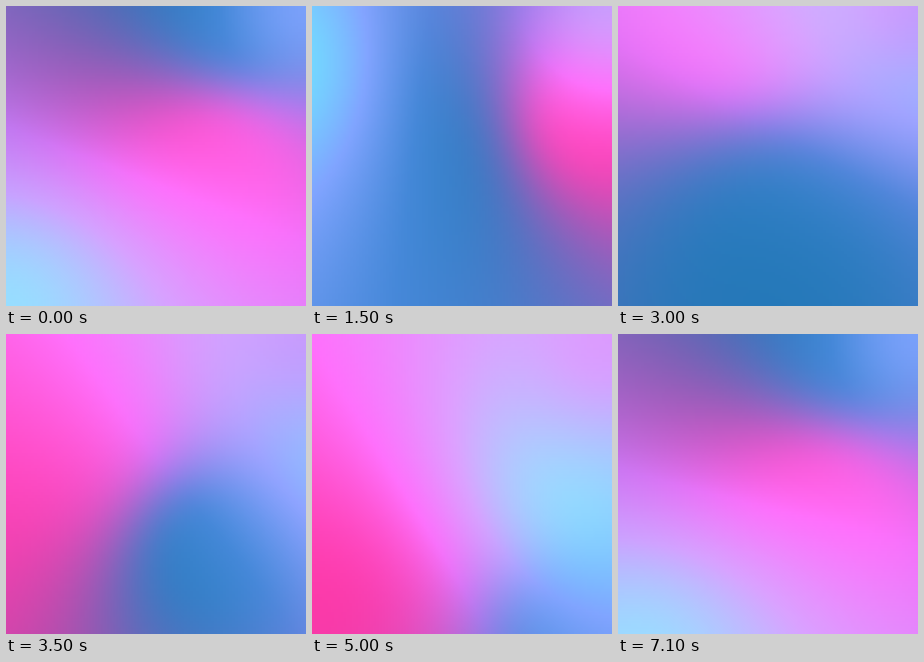
An HTML page with a canvas for the animation above (7.2 s loop, 300x300 px).

```html
<!DOCTYPE html>
<html lang="en">
<head>
<meta charset="utf-8">
<title>Drifting gradient</title>
<style>
  html, body { margin: 0; width: 100%; height: 100%; overflow: hidden; }
  canvas { display: block; width: 100vw; height: 100vh; }
</style>
</head>
<body>
<canvas id="stage" width="100" height="100"></canvas>
<script>
const LOOP = 7200, STEP = 100, SIZE = 300, GRID = 100, TAU = Math.PI * 2;
// Key times; the orbits rest between 4200 and 5100.
const TIMES = [0, 800, 2300, 3500, 4200, 5100, 6000, LOOP];
const POSES = [0, 1, 2, 3, 4, 4, 5, 6];

// Four poles circle the middle of the stage once per loop: pink and blue one way,
// light and dark the other. Angles in degrees, radii in pixels, one per pose.
const orbit = (turn, angles, radii) =>
  ({ angles: [...angles, angles[0] + turn], radii: [...radii, radii[0]] });
const pink = orbit(-360, [23, 0, -38, -143, -153, -188], [65, 105, 178, 150, 112, 71]);
const blue = orbit(-360, [-61, -156, -233, -311, -311, -400], [184, 98, 100, 92, 184, 156]);
const light = orbit(360, [133, 131, 288, 337, 355, 394], [219, 227, 221, 260, 110, 302]);
const dark = orbit(360, [263, 265, 413, 486, 495, 585], [171, 120, 150, 222, 212, 311]);
// How strongly blue outweighs pink in each pose.
const BLUENESS = [1, 4, 2.5, 0.35, 0.2, 0.3, 1];

// Colour ramps from dark to light.
const ramp = text => text.split(' ').map(c => [0, 2, 4].map(i => parseInt(c.slice(i, i + 2), 16)));
const PINKS = ramp('ff38a8 ff70fc dca2ff a0dcff');
const BLUES = ramp('2478b8 4488d8 80a4ff 70e4ff');

const ctx = document.getElementById('stage').getContext('2d');
const image = ctx.createImageData(GRID, GRID);
const mix = (a, b, u) => a + (b - a) * u;
const smooth = u => u * u * (3 - 2 * u);
const dist2 = (x, y, p) => (x - p.x) ** 2 + (y - p.y) ** 2;

// 1 at pole a, 0 at pole b; a bigger weight shrinks the realm of a.
function between(x, y, a, b, weight) {
  const toB = dist2(x, y, b);
  return toB / (toB + weight * dist2(x, y, a) + 1e-6);
}

function draw(t) {
  const k = TIMES.findIndex(end => end > t);
  const u = (t - TIMES[k - 1]) / (TIMES[k] - TIMES[k - 1]);
  const at = keys => mix(keys[POSES[k - 1]], keys[POSES[k]], u);
  const place = ({ angles, radii }) => {
    const a = at(angles) / 360 * TAU, r = at(radii);
    return { x: SIZE / 2 + r * Math.cos(a), y: SIZE / 2 + r * Math.sin(a) };
  };
  const [p, b, l, d] = [pink, blue, light, dark].map(place);
  const weight = at(BLUENESS), corner = { x: SIZE, y: 0 };

  for (let i = 0; i < GRID * GRID; i++) {
    const x = (i % GRID + 0.5) * SIZE / GRID;
    const y = (Math.floor(i / GRID) + 0.5) * SIZE / GRID;
    const hue = smooth(between(x, y, p, b, weight));
    // The top right corner always glows softly.
    const glow = Math.exp(-dist2(x, y, corner) / (2 * 75 ** 2));
    const tone = 3 * mix(between(x, y, l, d, 2), 0.62, glow);
    const stop = Math.min(2, Math.floor(tone)), rest = tone - stop;
    for (let c = 0; c < 3; c++) {
      image.data[i * 4 + c] = mix(
        mix(BLUES[stop][c], BLUES[stop + 1][c], rest),
        mix(PINKS[stop][c], PINKS[stop + 1][c], rest), hue);
    }
    image.data[i * 4 + 3] = 255;
  }
  ctx.putImageData(image, 0, 0);
}

const start = performance.now();
let shown = -1;
function tick() {
  const t = Math.floor(((performance.now() - start) % LOOP) / STEP) * STEP;
  if (t !== shown) draw(shown = t);
  requestAnimationFrame(tick);
}
tick();
</script>
</body>
</html>
```
